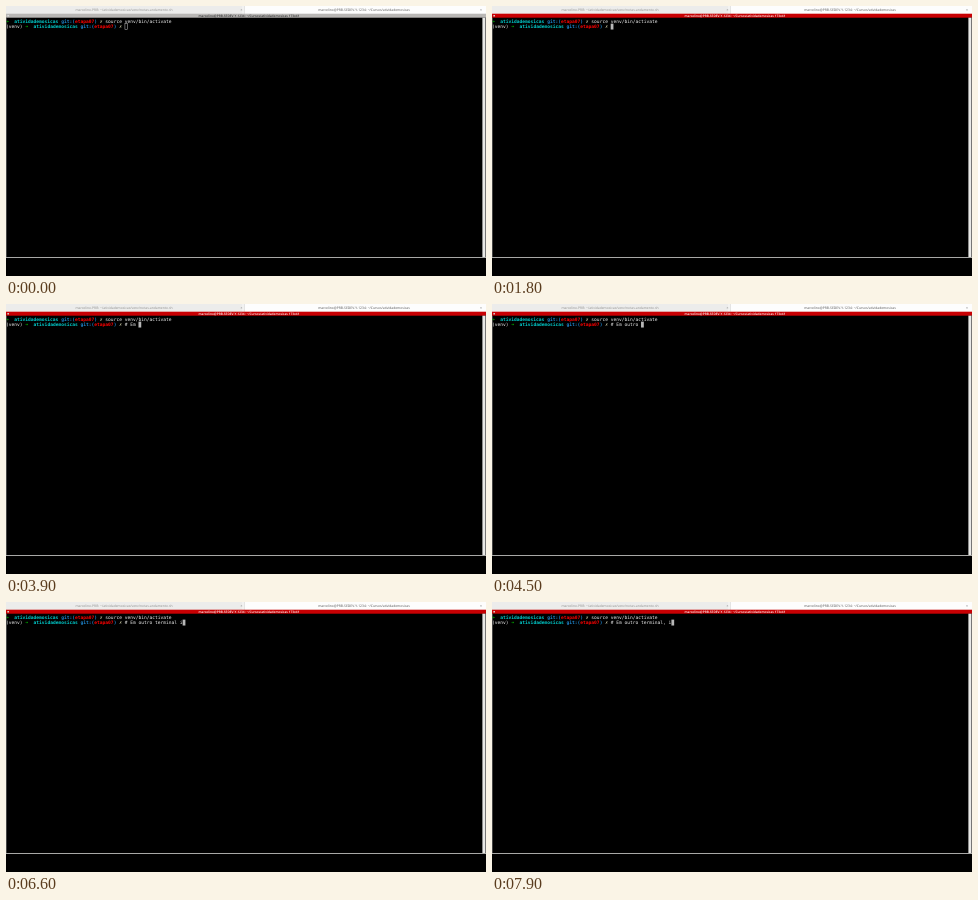
Recreate the animation shown at these times as an HTML page. Size 480 px wide and 270 px high, loop 8000 ms.

```html
<!DOCTYPE html>
<html lang="pt">
<head>
<meta charset="utf-8">
<title>Terminal</title>
<style>
html, body { margin: 0; width: 100%; height: 100%; overflow: hidden; background: #000; }
svg { display: block; width: 100vw; height: 100vh; }
text { white-space: pre; text-rendering: geometricPrecision; }
.ui { font: 3.36px "Open Sans", "Noto Sans", sans-serif; text-anchor: middle; }
#title { font-size: 3.2px; font-weight: 600; }
.mono { font: 4.585px "DejaVu Sans Mono", monospace; fill: #f2f2f2; }
.bold { font-weight: bold; }
.arrow { fill: #00cd00; }
.dir { fill: #00cdcd; }
.git { fill: #1f88d2; }
.branch { fill: #f00; }
.dirty { fill: #dcdcb4; }
</style>
</head>
<body>
<svg viewBox="0 0 480 270">
  <rect width="480" height="270"/>
  <rect width="236" height="8" fill="#ececeb"/>
  <rect x="239" width="241" height="8" fill="#fdfdfd"/>
  <rect x="236" width="3" height="8" fill="#f2f2f1"/>
  <rect x="238.6" width=".4" height="8" fill="#d0d0ce"/>
  <g class="ui">
    <text x="118" y="5.1" fill="#8f8f8d">marcelino-PRB: ~/atividademosicas/venv/notas-andamento.sh</text>
    <text x="358" y="5.1" fill="#555">marcelino@PRB-SEDEV-Y-1234: ~/Cursos/atividademosicas</text>
    <text x="235.5" y="5.1" fill="#777">×</text>
    <text x="475" y="5.1" fill="#555">×</text>
  </g>
  <rect id="bar" y="7.7" width="480" height="4"/>
  <rect x="1.4" y="9" width="1.5" height="1.5" fill="#ddd"/>
  <text id="title" class="ui" x="243" y="10.9">marcelino@PRB-SEDEV-Y-1234: ~/Cursos/atividademosicas 173x41</text>
  <rect y="11.7" width=".5" height="240" fill="#888"/>
  <rect x="476.4" y="11.7" width="3" height="239.6" fill="#e8e8e6"/>
  <rect x="479.4" y="11.7" width=".6" height="240" fill="#888"/>
  <rect y="251" width="480" height="1" fill="#a8a8a6"/>
  <g id="screen" class="mono"></g>
  <text id="typed" class="mono"></text>
  <rect id="cursor" width="2.76" height="5.9"/>
  <path id="pointer" d="M-.9-2.2H.9M0-2.2V2.2M-.9 2.2H.9" fill="none" stroke="#bbb" stroke-width=".5"/>
</svg>
<script>
const LOOP = 8000, COL = 2.76, ROW = 5.83, TOP = 12, INPUT = 43;
const el = id => document.getElementById(id);
const bar = el("bar"), title = el("title"), screen = el("screen");
const typed = el("typed"), cursor = el("cursor"), pointer = el("pointer");

// [time, typed text]
const typing = [
  [0, ""], [1400, "#"], [1800, ""], [2400, "#"], [2900, "# "],
  [3200, "# E"], [3400, "# Em"], [3900, "# Em "],
  [4100, "# Em o"], [4200, "# Em ou"], [4300, "# Em out"],
  [4400, "# Em outro"], [4500, "# Em outro "],
  [5100, "# Em outro t"], [5200, "# Em outro te"], [5300, "# Em outro ter"],
  [5400, "# Em outro term"], [5500, "# Em outro termi"],
  [5700, "# Em outro termin"], [5800, "# Em outro termina"],
  [5900, "# Em outro terminal "], [6600, "# Em outro terminal i"],
  [6700, "# Em outro terminal in"], [7000, "# Em outro terminal i"],
  [7100, "# Em outro terminal "], [7400, "# Em outro terminal"],
  [7600, "# Em outro terminal,"], [7700, "# Em outro terminal, "],
  [7900, "# Em outro terminal, i"]
];

// [time, x, y]
const moves = [[300, 178, 170], [400, 173, 138], [500, 169, 117], [600, 168, 109.4]];

const last = (list, t) => list.filter(step => step[0] <= t).pop();

function place(node, col, row) {
  node.setAttribute("x", col * COL);
  node.setAttribute("y", TOP + row * ROW + 4.5);
}

function print(col, row, str, cls = "") {
  const node = document.createElementNS("http://www.w3.org/2000/svg", "text");
  node.setAttribute("class", cls);
  node.textContent = str;
  place(node, col, row);
  screen.append(node);
}

function prompt(col, row) {
  print(col, row, "➜", "bold arrow");
  print(col + 3, row, "atividademosicas", "bold dir");
  print(col + 20, row, "git:(", "bold git");
  print(col + 25, row, "etapa07", "bold branch");
  print(col + 32, row, ")", "bold git");
  print(col + 34, row, "✗", "bold dirty");
}

function draw(t) {
  const focus = t >= 300;
  bar.setAttribute("fill", focus ? "#c80003" : "#b9b7b5");
  title.setAttribute("fill", focus ? "#fff" : "#333");

  const str = last(typing, t)[1];
  typed.textContent = str;
  cursor.setAttribute("x", (INPUT + str.length) * COL + (focus ? 0 : .25));
  cursor.setAttribute("fill", focus ? "#b8b8b8" : "none");
  cursor.setAttribute("stroke", focus ? "none" : "#c8c8c8");
  const blinkOff = t >= 1200 && t < 1400;
  cursor.setAttribute("visibility", blinkOff ? "hidden" : "visible");

  const shown = focus && t < 1400;
  pointer.setAttribute("visibility", shown ? "visible" : "hidden");
  if (shown) {
    const [, x, y] = last(moves, t);
    pointer.setAttribute("transform", `translate(${x} ${y})`);
  }
}

prompt(0, 0);
print(36, 0, "source venv/bin/activate");
print(0, 1, "(venv)");
prompt(7, 1);
place(typed, INPUT, 1);
cursor.setAttribute("y", TOP + ROW - .2);
cursor.setAttribute("stroke-width", .5);

const start = performance.now();
function tick() {
  draw((performance.now() - start) % LOOP);
  requestAnimationFrame(tick);
}
tick();
</script>
</body>
</html>
```
